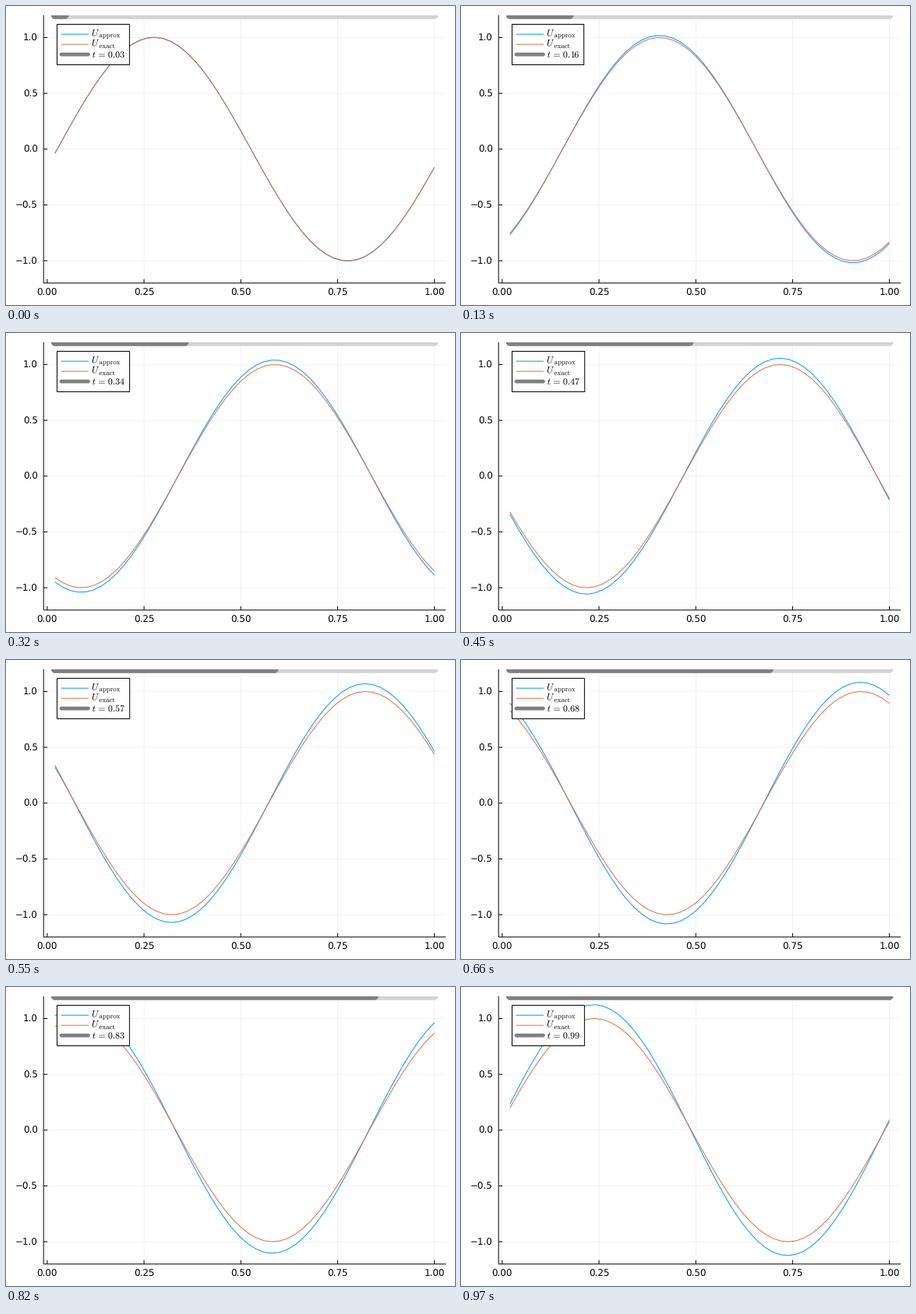
Recreate the animation shown at these times as a matplotlib script. Size 576 by 384 pixels, loop 990 ms.

```python
import matplotlib.pyplot as plt
import numpy as np
from matplotlib.animation import FuncAnimation
from matplotlib.patches import PathPatch, Rectangle
from matplotlib.textpath import TextPath
from matplotlib.transforms import Affine2D

plt.rcParams.update({
    "font.family": "DejaVu Sans",
    "mathtext.fontset": "cm",
    "text.hinting": "none",
    "path.snap": False,
    "lines.solid_capstyle": "butt",
})

W, H, DPI = 576, 384, 72
LEFT, RIGHT, TOP, BOTTOM = 48.2, 564.2, 11.8, 355.8
BLUE, ORANGE = "#009af9", "#e26f46"

# Advection of a sine wave with an upwind scheme
DX, DT, STEPS = 0.02, 0.026, 38
X = DX * np.arange(1, 51)
THETA = 2 * np.pi * DX
GAIN = 1 - DT / DX * (1 - np.exp(-1j * THETA))

TICKS, INTERVAL = 99, 10  # 38 steps per second on a 10 ms clock


def px(x):
    return LEFT + (x + 0.0094) / 1.0388 * (RIGHT - LEFT)


def py(y):
    return TOP + (1.2 - y) / 2.4 * (BOTTOM - TOP)


fig = plt.figure(figsize=(W / DPI, H / DPI), dpi=DPI, facecolor="white")
ax = fig.add_axes([0, 0, 1, 1])
ax.set_xlim(0, W)
ax.set_ylim(H, 0)
ax.axis("off")


def line(xs, ys, color="black", lw=1.0, z=2, **kw):
    return ax.plot(xs, ys, color=color, lw=lw, zorder=z, **kw)[0]


def label(x, y, s, ha):
    ax.text(x, y, s, fontsize=11.9, ha=ha, va="baseline")


def math_path(x, y, s, size=11.9):
    flip = Affine2D().scale(1, -1).translate(x, y)
    return TextPath((0, 0), f"${s}$", size=size).transformed(flip)


def math(*args):
    return ax.add_patch(PathPatch(math_path(*args), fc="black", lw=0, zorder=9))


# Grid, ticks and tick labels
for v in np.arange(0, 1.01, 0.25):
    x = px(v)
    line([x, x], [TOP, BOTTOM], lw=0.5, z=1, alpha=0.1)
    line([x, x], [BOTTOM, BOTTOM - 5])
    label(x, 371.6, f"{v:.2f}", "center")
for v in np.arange(-1, 1.01, 0.5):
    y = py(v)
    line([LEFT, RIGHT], [y, y], lw=0.5, z=1, alpha=0.1)
    line([LEFT, LEFT + 5], [y, y])
    label(40.7, y + 4.5, f"{v:.1f}".replace("-", "\u2212"), "right")
line([LEFT, LEFT], [TOP, BOTTOM])
line([LEFT, RIGHT], [BOTTOM, BOTTOM])

# Curves and progress bar
approx = line([], [], BLUE, z=3)
exact = line([], [], ORANGE, z=4)
clip = Rectangle((LEFT, TOP), RIGHT - LEFT, BOTTOM - TOP,
                 transform=ax.transData)
bar_style = dict(lw=10, solid_capstyle="round")
track = line(px(X[[0, -1]]), [TOP, TOP], "lightgray", z=5, **bar_style)
bar = line([], [], "gray", z=6, **bar_style)
for b in (track, bar):
    b.set_clip_path(clip)

# Legend
box = Rectangle((65.5, 23.5), 93, 52, fc="white", ec="black", lw=1, zorder=7)
ax.add_patch(box)
line([70.7, 106], [36.2, 36.2], BLUE, z=8)
line([70.7, 106], [49.2, 49.2], ORANGE, z=8)
line([71, 105.5], [62.2, 62.2], "gray", lw=4.8, z=8, solid_capstyle="round")
for name, y, y_sub in (("approx", 38.6, 40.2), ("exact", 51.4, 54.1)):
    math(110, y, "U")
    math(119.5, y_sub, rf"\mathrm{{{name}}}", 8.9)
clock = math(110.7, 66.2, "t")


def clock_path(t):
    digits = str(round(t, 2)).replace("1", r"\hspace{-0.135}1\hspace{-0.135}")
    return math_path(110.7, 66.2,
                     rf"t\hspace{{0.117}}=\hspace{{0.117}}{digits}")


def draw(tick):
    k = int((tick + 0.5) * STEPS / 100) + 1
    t = k * DT
    exact.set_data(px(X), py(np.sin(2 * np.pi * (X - t))))
    approx.set_data(px(X), py((GAIN**k * np.exp(2j * np.pi * X)).imag))
    bar.set_data(px(np.array([X[0], X[0] + 0.98 * k / STEPS])), [TOP, TOP])

    path = clock_path(t)
    clock.set_path(path)
    box.set_width(max(path.get_extents().x1 + 6.9, 153) - box.get_x())
    return approx, exact, bar, box, clock


anim = FuncAnimation(fig, draw, frames=TICKS, interval=INTERVAL, repeat=True,
                     blit=False)
plt.show()
```
